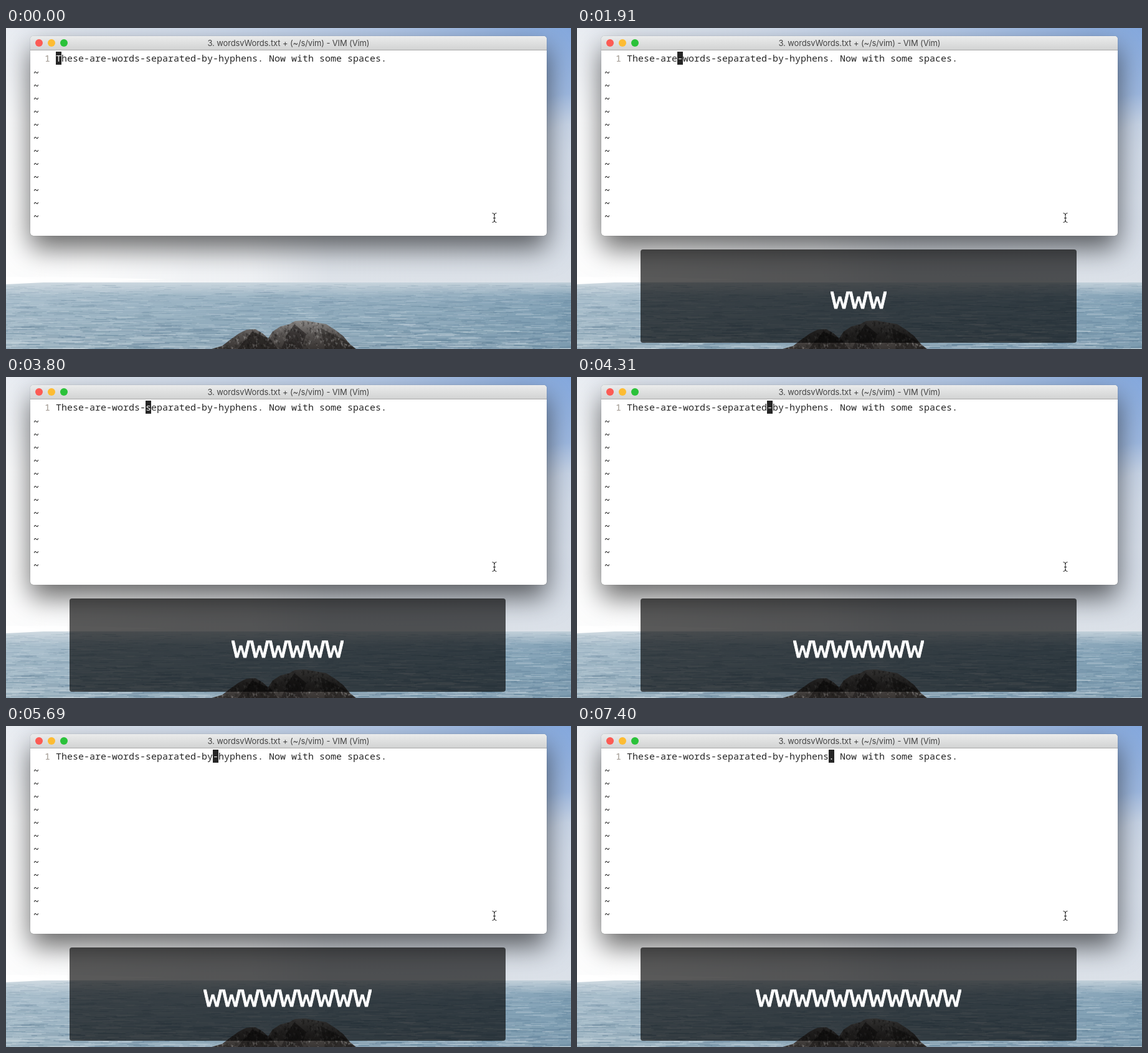
Animation, 907 px wide and 516 px high, one loop 8 s. Source, as an HTML page with a canvas:

```html
<!DOCTYPE html>
<html lang="en">
<head>
<meta charset="utf-8">
<title>Vim word motion</title>
<style>
html, body { margin: 0; width: 100%; height: 100%; overflow: hidden; }
body { position: relative; background: #fff; }
div, span, canvas, svg { position: absolute; white-space: pre; }

.window {
  left: 39px; top: 13px; width: 829px; height: 321px;
  border-radius: 5px; background: #fff;
  box-shadow: 0 0 1px rgba(0,0,0,.5), 0 20px 44px rgba(0,0,0,.6);
}
.bar {
  left: 0; top: 0; width: 829px; height: 22px;
  border-radius: 5px 5px 0 0; border-bottom: 1px solid #a9a9a9;
  background: linear-gradient(#ebecec, #d2d3d3);
  font: 13px/23px Inter, sans-serif; letter-spacing: -.13px;
  color: #444; text-align: center;
}
.dot { top: 5px; width: 12px; height: 12px; border-radius: 50%; }

.term { font: 15px/21px "Noto Sans Mono", monospace; color: #262626; }
.row { left: 44px; color: #000; }
.number { left: 62px; top: 38px; color: #9c948c; }
.line { left: 80px; top: 38px; }
.cursor {
  top: 38px; width: 9px; height: 21px; overflow: hidden;
  background: #262626; color: #f4f4f4;
  animation: cursor 8s step-end infinite;
}
.cursor span { top: 0; animation: glyph 8s step-end infinite; }

.panel {
  left: 102px; top: 356px; width: 700px; height: 150px;
  border-radius: 4px; background: rgba(0,0,0,.65);
  animation: show 8s step-end infinite;
}
.keys {
  left: 350px; top: 38px; height: 80px; overflow: hidden;
  transform: translateX(-50%);
  font: 50px/80px "DejaVu Sans Mono", monospace; letter-spacing: -.1px;
  color: #fff; -webkit-text-stroke: .8px #fff;
  animation: keys 8s step-end infinite;
}

@keyframes show { 0% { opacity: 0 } 7.125%, 100% { opacity: 1 } }
@keyframes cursor {
  0% { left: 80px } 11.625% { left: 125px } 16.125% { left: 134px }
  23.875% { left: 161px } 31% { left: 170px } 36.25% { left: 215px }
  47.5% { left: 224px } 53.875% { left: 305px } 62.875% { left: 314px }
  71.125% { left: 332px } 79.25% { left: 341px } 92.5%, 100% { left: 404px }
}
@keyframes glyph {
  0% { left: 0 } 11.625% { left: -45px } 16.125% { left: -54px }
  23.875% { left: -81px } 31% { left: -90px } 36.25% { left: -135px }
  47.5% { left: -144px } 53.875% { left: -225px } 62.875% { left: -234px }
  71.125% { left: -252px } 79.25% { left: -261px } 92.5%, 100% { left: -324px }
}
@keyframes keys {
  0% { width: 30px } 16.125% { width: 60px } 21.75% { width: 90px }
  31% { width: 120px } 36.25% { width: 150px } 47.5% { width: 180px }
  53.875% { width: 210px } 62.875% { width: 240px } 71.125% { width: 270px }
  79.25% { width: 300px } 92.5%, 100% { width: 330px }
}
</style>
</head>
<body>
<canvas id="scene" width="907" height="516" style="left:0;top:0"></canvas>

<div class="window">
  <div class="bar">3. wordsvWords.txt + (~/s/vim) - VIM (Vim)</div>
  <div class="dot" style="left:8px;background:#fc5b54"></div>
  <div class="dot" style="left:28px;background:#fdbc33"></div>
  <div class="dot" style="left:48px;background:#2bc23a"></div>
</div>

<div class="term" id="term" style="left:0;top:0">
  <span class="number">1</span>
  <span class="line">These-are-words-separated-by-hyphens. Now with some spaces.</span>
  <div class="cursor"><span>These-are-words-separated-by-hyphens. Now with some spaces.</span></div>
</div>

<svg style="left:779px;top:296px" width="11" height="19" fill="none">
  <path d="M1.5 1.5Q5 1.5 5 4.5Q5 1.5 8.5 1.5M5 4V14M3 9.5H7M1.5 16.5Q5 16.5 5 13.5Q5 16.5 8.5 16.5" stroke="#222"/>
</svg>

<div class="panel"><div class="keys">wwwwwwwwwww</div></div>

<script>
const ctx = document.getElementById('scene').getContext('2d');
const W = 907, H = 516, HORIZON = 409;

let seed = 7;
const rand = () => (seed = seed * 16807 % 2147483647) / 2147483647;

function stops(g, colors) {
  colors.forEach((c, i) => g.addColorStop(i / (colors.length - 1), c));
  return g;
}
const fade = (x0, y0, x1, y1, ...colors) =>
  stops(ctx.createLinearGradient(x0, y0, x1, y1), colors);

function rect(fill, x, y, w, h) {
  ctx.fillStyle = fill;
  ctx.fillRect(x, y, w, h);
}
function glow(x, y, r, rgb, alpha) {
  const g = ctx.createRadialGradient(x, y, 0, x, y, r);
  rect(stops(g, [`rgba(${rgb},${alpha})`, `rgba(${rgb},${alpha * .85})`, `rgba(${rgb},0)`]), 0, 0, W, HORIZON);
}
function poly(fill, ...pts) {
  ctx.fillStyle = fill;
  ctx.beginPath();
  for (let i = 0; i < pts.length; i += 2) ctx.lineTo(pts[i], pts[i + 1]);
  ctx.closePath();
  ctx.fill();
}

function sky() {
  rect(fade(0, 0, W, 0, '#e7ebf1', '#d3deee', '#b4c9e8', '#84a8dd'), 0, 0, W, HORIZON);
  rect(fade(0, 0, 0, HORIZON, 'rgba(226,231,238,0)', 'rgba(226,231,238,.35)', 'rgba(226,230,236,.85)', 'rgba(224,228,233,.95)'), 0, 0, W, HORIZON);
  glow(W, 205, 100, '217,224,234', .75);
  glow(-20, 310, 330, '255,255,255', 1);
  glow(260, 400, 260, '255,255,255', .6);
}

function sea() {
  const depth = H - HORIZON;
  rect(fade(0, HORIZON, 0, H, '#a3b9c8', '#8da9bb', '#86a3b5', '#8ba5b5'), 0, HORIZON, W, depth);
  rect(fade(0, 0, W, 0, 'rgba(215,225,231,.35)', 'rgba(180,198,210,.15)', 'rgba(104,141,167,.4)'), 0, HORIZON, W, depth);
  rect(fade(0, HORIZON, 0, HORIZON + 22, 'rgba(225,231,235,.6)', 'rgba(225,231,235,0)'), 0, HORIZON, W, 22);
  for (let i = 0; i < 2400; i++) {
    const d = rand(), y = HORIZON + 3 + d * 106;
    const x = rand() * (W + 60) - 60, w = 10 + rand() * (18 + 34 * d);
    const a = .06 + rand() * (.14 + .14 * d);
    rect(rand() < .5 ? `rgba(224,232,237,${a})` : `rgba(68,103,128,${a})`, x, y, w, .7 + d);
  }
  poly('#fff', 0, 400, 130, 401, 256, 404, 180, 407, 60, 409, 0, 412);
}

function rock() {
  const outline = [330, 516, 347, 511, 360, 501, 374, 491, 386, 485, 400, 484, 412, 491,
    421, 499, 428, 488, 440, 480, 455, 476, 464, 471, 480, 470, 496, 473, 514, 476,
    528, 485, 541, 495, 552, 508, 562, 516];
  ctx.save();
  poly(fade(0, 470, 0, H, '#8b8987', '#55514f', '#383432'), ...outline);
  ctx.clip();
  poly('rgba(30,27,26,.65)', 395, 488, 424, 500, 436, 516, 372, 516);
  poly('rgba(30,27,26,.55)', 463, 476, 482, 492, 474, 516, 442, 516, 452, 492);
  poly('rgba(30,27,26,.45)', 505, 482, 548, 504, 560, 516, 512, 516);
  for (let i = 0; i < 800; i++) {
    const x = 330 + rand() * 232, y = 470 + rand() * 46, s = 1 + rand() * 4;
    const a = .12 + rand() * .3;
    poly(rand() < .35 ? `rgba(172,170,168,${a})` : `rgba(25,23,22,${a})`,
      x, y, x + s, y + s * .4, x + s * .4, y + s * 1.4);
  }
  ctx.restore();
}

sky();
sea();
rock();

const term = document.getElementById('term');
for (let i = 1; i <= 12; i++) {
  const row = document.createElement('span');
  row.className = 'row';
  row.style.top = 40 + 21 * i + 'px';
  row.textContent = '~';
  term.append(row);
}
</script>
</body>
</html>
```
